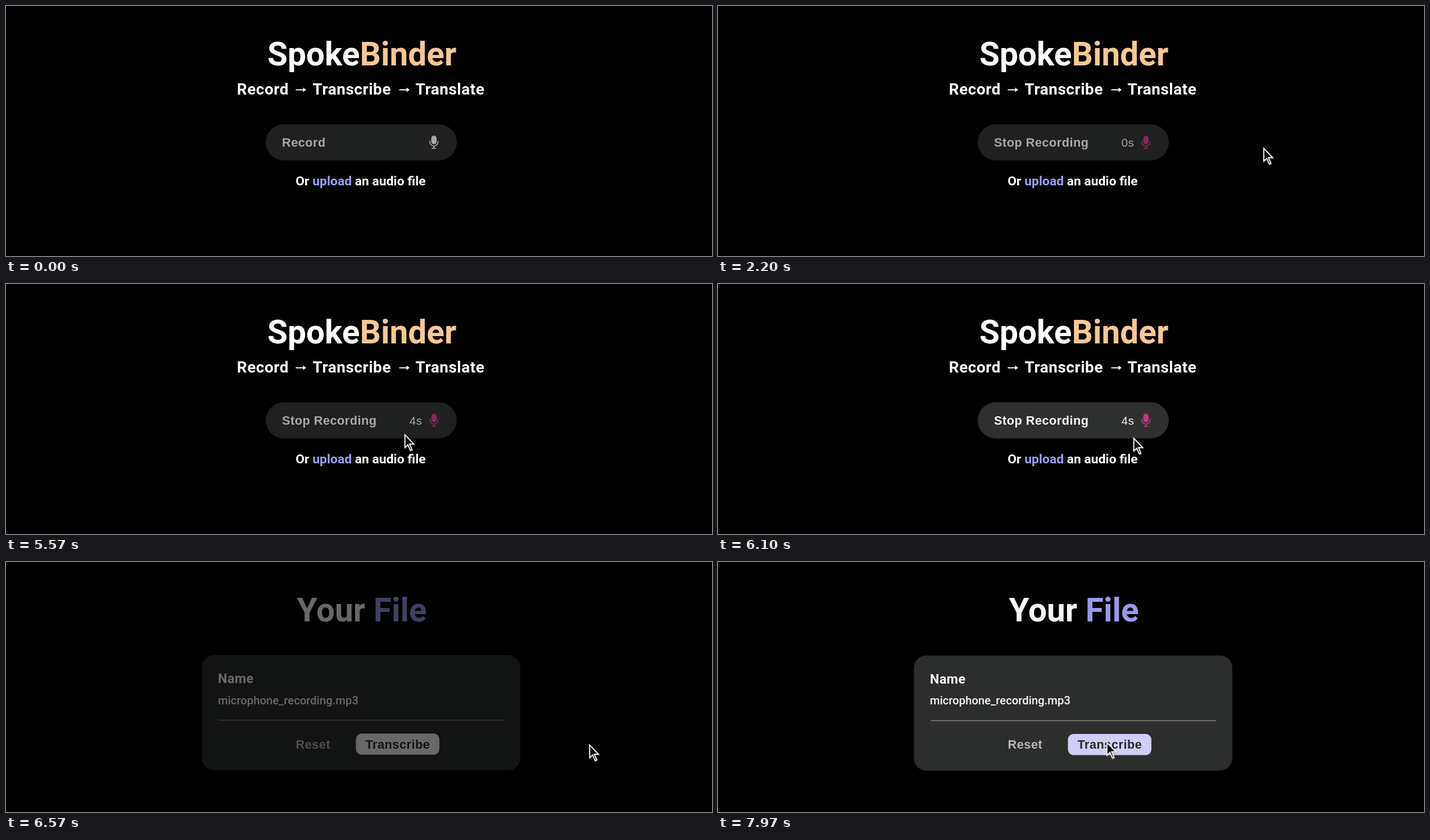
An HTML page that plays this animation: 1256x446 px, repeating every 8 s.

```html
<!DOCTYPE html>
<html lang="en">
<head>
<meta charset="utf-8">
<title>Record and transcribe</title>
<style>
  html, body { margin: 0; width: 100%; height: 100%; overflow: hidden; background: #000; }
  svg { display: block; width: 1256px; height: 446px; }
  text { font-family: Roboto, sans-serif; fill: #fff; white-space: pre; }
  .title { font-size: 58.6px; font-weight: 600; }
  .steps { font-size: 28px; font-weight: 600; letter-spacing: .5px; }
  .hint { font-size: 22.9px; font-weight: 600; }
  .label { font-family: "Liberation Sans", Arial, sans-serif; font-size: 21.8px; font-weight: 700; letter-spacing: .45px; }
  .timer { font-family: "Liberation Sans", Arial, sans-serif; font-size: 20.4px; letter-spacing: .5px; }
  .field { font-size: 23.4px; font-weight: 600; letter-spacing: .4px; }
  .filename { font-size: 20.3px; font-weight: 500; }
  .orange { fill: #f7c892; }
  .indigo { fill: #9c9ff0; }
</style>
</head>
<body>
<svg viewBox="0 0 1256 446">
  <defs>
    <g id="arrow">
      <path d="M0 0H15" stroke="#fff" stroke-width="2"/>
      <path d="M13-4L18.5 0L13 4Z" fill="#fff"/>
    </g>
  </defs>

  <g id="recordScreen">
    <text class="title" x="629.5" y="105.5" text-anchor="end">Spoke</text>
    <text class="title orange" x="629.5" y="105.5">Binder</text>
    <text class="steps" x="410.8" y="157.5">Record</text>
    <text class="steps" x="545.5" y="157.5">Transcribe</text>
    <text class="steps" x="728.5" y="157.5">Translate</text>
    <use href="#arrow" x="515.5" y="149.5"/>
    <use href="#arrow" x="699.5" y="149.5"/>

    <g id="pill">
      <rect x="462" y="211" width="340" height="64.5" rx="32.2" fill="#303131"/>
      <text id="pillLabel" class="label" x="491" y="251">Record</text>
      <text id="timer" class="timer" x="717.8" y="251"></text>
      <g id="mic" fill="#fff" stroke="#fff">
        <rect x="756.6" y="231.3" width="9.4" height="15.4" rx="4.7" stroke="none"/>
        <path d="M754 240.5V242.5a7.3 7.3 0 0 0 14.6 0V240.5M761.3 250V254M757.3 253.8H765.3" fill="none" stroke-width="1.7"/>
      </g>
    </g>
    <text class="hint" x="515.3" y="320">Or <tspan class="indigo">upload</tspan> an audio file</text>
  </g>

  <g id="fileScreen">
    <text class="title" x="517.5" y="105.5">Your <tspan class="indigo">File</tspan></text>
    <rect x="348.5" y="166" width="566.5" height="205.5" rx="22" fill="#2e2f2f"/>
    <text class="field" x="377" y="216">Name</text>
    <text class="filename" x="377" y="253.8">microphone_recording.mp3</text>
    <rect x="378.5" y="281.2" width="507.5" height="2.2" fill="#707069"/>
    <text class="label" x="515.6" y="332.5" style="fill:#bcbcbc">Reset</text>
    <rect id="submit" x="622.5" y="306" width="148.5" height="37.7" rx="10"/>
    <text class="label" x="639.5" y="332.5" style="fill:#2c2c2e">Transcribe</text>
  </g>

  <g id="cursor">
    <path d="M0 0V26.5L5.8 21.2L10.2 31.2L14.8 29.2L10.6 19.4H18.5Z" transform="translate(1.5 2)" fill="#777" opacity=".35"/>
    <path d="M1 2V24.8L6.3 19.8L10.7 30L13.6 28.8L9.4 18.6H16.8Z" fill="#080808" stroke="#eee" stroke-width="2"/>
  </g>
</svg>

<script>
const LOOP = 8000;
const CLICK_RECORD = 1570;
const SHOW_FILE = 6165;
const $ = id => document.getElementById(id);

// time, x, y
const path = [
  [370, 690, 450], [700, 703, 335], [1050, 700, 250], [1300, 699, 244], [1560, 699, 244],
  [1800, 860, 278], [2000, 967, 256], [2200, 970, 252], [5030, 970, 252],
  [5300, 835, 286], [5570, 709, 267], [5750, 698, 252], [5920, 698, 252],
  [6150, 760, 280], [6400, 920, 308], [6640, 1056, 330], [6720, 1056, 332],
  [7000, 900, 384], [7300, 716, 357], [7600, 692, 325], [7750, 691, 320], [8000, 691, 320]
];

const ramp = (t, from, to) => Math.min(1, Math.max(0, (t - from) / (to - from)));
const mix = (a, b, k) => a + (b - a) * k;

// Tangent that vanishes at rests and turning points, so nothing overshoots.
function slope(i, axis) {
  const a = path[i - 1], b = path[i], c = path[i + 1];
  if (!a || !c || (b[axis] - a[axis]) * (c[axis] - b[axis]) <= 0) return 0;
  return (c[axis] - a[axis]) / (c[0] - a[0]);
}

function position(t, axis) {
  const next = path.findIndex(p => p[0] > t);
  const i = Math.max(0, next - 1), a = path[i], b = path[i + 1];
  const d = b[0] - a[0], u = ramp(t, a[0], b[0]), v = 1 - u;
  return (1 + 2 * u) * v * v * a[axis] + u * u * (3 - 2 * u) * b[axis]
    + d * (u * v * v * slope(i, axis) - u * u * v * slope(i + 1, axis));
}

function draw(t) {
  const recording = t >= CLICK_RECORD, onFile = t >= SHOW_FILE;
  $('recordScreen').style.display = onFile ? 'none' : '';
  $('fileScreen').style.display = onFile ? '' : 'none';

  const hover = ramp(t, 980, 1180) - ramp(t, 1780, 2000) + ramp(t, 5580, 5780) - ramp(t, 6080, 6280);
  $('pill').setAttribute('opacity', mix(.66, 1, hover));
  $('pillLabel').textContent = recording ? 'Stop Recording' : 'Record';
  $('timer').textContent = recording ? Math.floor((t - CLICK_RECORD) / 1000) + 's' : '';
  const micColor = recording ? '#cc3c8a' : '#fff';
  $('mic').setAttribute('fill', micColor);
  $('mic').setAttribute('stroke', micColor);

  const pressed = t >= 7930;
  $('fileScreen').setAttribute('opacity', pressed ? .97 : ramp(t, SHOW_FILE, SHOW_FILE + 1000));
  $('fileScreen').setAttribute('transform', `translate(0 ${pressed ? .7 : 0})`);
  const tint = ramp(t, 7620, 7820), shade = mix(255, 213, tint);
  $('submit').setAttribute('fill', `rgb(${shade},${shade},255)`);

  $('cursor').style.display = t < path[0][0] ? 'none' : '';
  $('cursor').setAttribute('transform', `translate(${position(t, 1)} ${position(t, 2)})`);
}

const start = performance.now();
function tick() {
  draw((performance.now() - start) % LOOP);
  requestAnimationFrame(tick);
}
tick();
</script>
</body>
</html>
```
